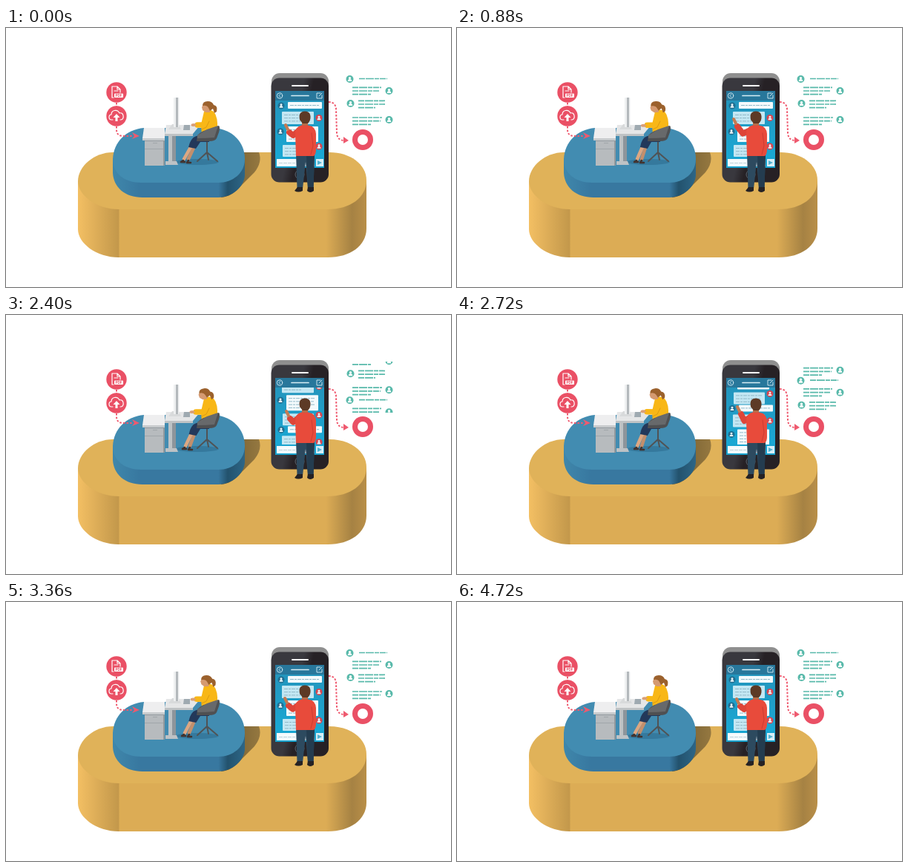
Write an HTML page that moves like this. It is 600 by 350 pixels and loops after 4800 ms.

```html
<!DOCTYPE html>
<html lang="en">
<head>
<meta charset="utf-8">
<title>Chat and upload</title>
<style>
html, body { margin: 0; width: 100%; height: 100%; overflow: hidden; background: #fff; }
svg { display: block; width: 600px; height: 350px; }
.line { fill: none; stroke-linecap: round; stroke-linejoin: round; }
.dots { fill: none; stroke: #ef5a6f; stroke-width: 2; stroke-dasharray: 2.6 2; }
</style>
</head>
<body>
<svg viewBox="0 0 600 350">
  <defs>
    <linearGradient id="goldSide" gradientUnits="userSpaceOnUse" x1="97" x2="486" y1="0" y2="0">
      <stop offset="0" stop-color="#f3bf63"/><stop offset=".14" stop-color="#c3984b"/>
      <stop offset=".145" stop-color="#dcac55"/><stop offset=".86" stop-color="#dcac55"/>
      <stop offset=".95" stop-color="#a68243"/><stop offset="1" stop-color="#b98f48"/>
    </linearGradient>
    <linearGradient id="blueSide" gradientUnits="userSpaceOnUse" x1="144" x2="322" y1="0" y2="0">
      <stop offset="0" stop-color="#3f87ab"/><stop offset=".2" stop-color="#3878a0"/>
      <stop offset=".8" stop-color="#3878a0"/><stop offset=".87" stop-color="#23526d"/>
      <stop offset="1" stop-color="#2d6687"/>
    </linearGradient>
    <linearGradient id="shade"><stop offset="0" stop-color="#6d582e"/><stop offset="1" stop-color="#957840"/></linearGradient>
    <linearGradient id="screen" x2="0" y2="1"><stop offset="0" stop-color="#2592b9"/><stop offset="1" stop-color="#18abd8"/></linearGradient>
    <linearGradient id="phoneFace" y2=".4"><stop offset=".5" stop-color="#39383e"/><stop offset=".65" stop-color="#262125"/></linearGradient>
    <clipPath id="feedClip"><rect x="450" y="63" width="80" height="69"/></clipPath>
    <clipPath id="chatClip"><rect x="363" y="98" width="66" height="77"/></clipPath>
  </defs>

  <!-- platforms -->
  <path fill="url(#goldSide)" d="M97 207V272C97 291 122 310 152 310H434C464 310 486 294 486 271V207Z"/>
  <path fill="#e0b259" d="M144 168H436C464 168 486 184 486 206C486 229 464 245 434 245H152C122 245 97 226 97 207C97 187 119 168 144 168Z"/>
  <path fill="url(#shade)" d="M300 168H341Q346 181 335 195L318 212Q305 228 290 229Z"/>
  <path fill="url(#blueSide)" d="M144 176V196C145 215 160 229 184 229H286C305 229 322 214 322 198V176Z"/>
  <path fill="#428cb1" d="M186 135H281C305 137 322 154 322 177C322 196 306 209 286 209H182C160 209 144 197 144 177C145 154 162 137 186 135Z"/>
  <ellipse cx="258" cy="181" rx="29" ry="4" fill="#35799d"/>

  <!-- upload badges -->
  <path class="dots" d="M149 101V106M149 133V137Q149 146 158 146H170"/>
  <path fill="#ef5a6f" d="M170 141L180 146L170 150L173 146Z"/>
  <g fill="#ea5065"><circle cx="149" cy="87" r="13.7"/><circle cx="149" cy="119" r="13.7"/></g>
  <g class="line" stroke="#fff" stroke-width="1.2">
    <path d="M145 94H143V79H150L154 83V87M150 79V83H154M146 85H151"/>
    <path d="M144 124H142C138 124 138 117 142 117C142 111 150 109 153 115C159 113 160 124 155 124H154"/>
  </g>
  <rect x="146" y="88.500" width="12" height="5.500" rx="1" fill="#fff"/>
  <text x="152" y="92.800" font-family="Liberation Sans, sans-serif" font-size="4.500" font-weight="700" fill="#ea5065" text-anchor="middle">PDF</text>
  <path fill="#fff" d="M149 116L153.500 121H150.500V126H147.500V121H144.500Z"/>

  <!-- desk -->
  <path fill="#8d959b" d="M219 143H229V180H219Z"/>
  <path fill="#bdc2c5" d="M219 143H224V180H219ZM215 180H230L232 185H215Z"/>
  <path fill="#92999e" d="M187 148H214V186H187Z"/>
  <path fill="#b7bbbe" d="M187 153H212V186H187Z"/>
  <path fill="#a0a6aa" d="M187 163H212V164H187ZM198 155H204V156H198Z"/>
  <path fill="#eeeeef" d="M186 135H214V149H184Z"/>
  <path fill="#c8cbcd" d="M184 149H214V152H184Z"/>
  <path fill="#e5e6e7" d="M216 131H262L252 143H214Z"/>
  <path fill="#bfc3c5" d="M214 143H252V146H214Z"/>
  <path fill="#d8dadb" d="M219 137L224 130H233L236 137Z"/>
  <rect x="226" y="94" width="7.500" height="40" rx="1" fill="#eef0f1"/>
  <path fill="#b4b9bc" d="M229 94H232V134H229Z"/>
  <path fill="#9faab1" d="M240 131H248V138H239Z"/>

  <!-- seated woman -->
  <g class="line">
    <path stroke="#505355" stroke-width="2" d="M271 151V170M271 168L258 180M271 168L285 180M271 168L273 178"/>
    <path id="farCalf" stroke="#c38f6c" stroke-width="4.500"/>
    <path id="nearCalf" stroke="#dca782" stroke-width="4.500"/>
    <path id="feet" stroke="#42332f" stroke-width="2.500"/>
  </g>
  <path id="skirt" fill="#23385a"/>
  <path fill="#f8b717" d="M267 113Q274 108 280 113Q286 120 285 137L281 145H264L263 130Z"/>
  <path id="sleeve" class="line" stroke="#f8b717" stroke-width="7.500"/>
  <path class="line" stroke="#dc9c13" stroke-width="1" d="M274 126L270 134L264 137"/>
  <ellipse id="typingHand" rx="3.500" ry="2" fill="#d9a078"/>
  <path fill="#4f5052" d="M287 132Q289 134 287 141L284 149Q282 153 274 153H257L258 145Q265 138 274 137Z"/>
  <path fill="#67696b" d="M286 132L271 137L258 145V149Q270 149 281 148Z"/>
  <g id="womanHead">
    <path fill="#d59a71" d="M266 103H275V114H269L265 111L264 107Z"/>
    <path fill="#9b612d" d="M265 105Q265 99 272 99Q278 99 280 104Q286 105 284 113L281 115L279 109L275 112L273 108Q271 104 265 105Z"/>
  </g>

  <!-- phone -->
  <rect x="358" y="61" width="77" height="134" rx="11" fill="#8f8f8f"/>
  <rect x="357.500" y="67.500" width="77.500" height="141" rx="11" fill="url(#phoneFace)"/>
  <path class="line" stroke="#fff" stroke-width="2" d="M386 78H407"/>
  <circle cx="396" cy="198" r="6" fill="none" stroke="#5a6670"/>
  <rect x="363" y="85" width="66" height="104" fill="url(#screen)"/>
  <g clip-path="url(#chatClip)"><g id="chatRows"></g></g>
  <path fill="#28779b" d="M363 85H429V98H363Z"/>
  <g class="line" stroke="#d8eef5" stroke-width=".9">
    <circle cx="369" cy="91.500" r="3.700"/><path d="M370 89.500L368 91.500L370 93.500"/>
    <path stroke-width="1.700" d="M385 91.500H408"/>
    <path d="M424 88H419V95H426V91M422 92L426 88"/>
  </g>
  <path fill="#18a3cf" d="M363 175H429V189H363Z"/>
  <path fill="#f5fafc" d="M365 177H416V187H365Z"/>
  <path stroke="#bdd2da" d="M368 182.500H390" stroke-dasharray="5 1"/>
  <path fill="#d8eff7" d="M418 177H428V187H418Z"/>
  <path fill="#4fb1d0" d="M420 179L426 182L420 185V182Z"/>

  <!-- standing man -->
  <path fill="#2d4a5f" d="M391 169H416L414.500 217H407L404 181L400 217H392.500Z"/>
  <path fill="#243c4f" d="M405 171H416L414.500 217H407Z"/>
  <path fill="#252224" d="M393 215H400V220Q394 223 389 220ZM407 215H415V220Q410 224 406 220Z"/>
  <path id="reachingArm" class="line" stroke="#dd4538" stroke-width="8"/>
  <path id="reachingHand" class="line" stroke="#c47b52" stroke-width="4"/>
  <path fill="#e84b3b" d="M397 132Q403 129 409 132Q417 133 418 143V165Q418 170 415 173H391L390 143Q390 134 397 132Z"/>
  <path class="line" stroke="#cb3c33" stroke-width="1" d="M412 142L414 159L411 171"/>
  <path fill="#b76d48" d="M399 124H407V131Q403 133 399 131Z"/>
  <path fill="#5d3a26" d="M395.500 119Q396 112.500 403 112.500Q410 112.500 410.500 119Q411 125 407 129H400L396 124Z"/>

  <!-- outgoing feed -->
  <path class="dots" d="M435 100Q444 100 445 109L446 142Q447 152 456 152"/>
  <path fill="#ef5a6f" d="M455 147L462 152L455 156Z"/>
  <circle cx="481" cy="151" r="14" fill="#ea5065"/>
  <circle cx="481" cy="151" r="7" fill="#fff"/>
  <g clip-path="url(#feedClip)"><g id="feedRows"></g></g>
</svg>
<script>
const LOOP = 4800, STEP = 80, FEED_PERIOD = 69, CHAT_PERIOD = 75;
const $ = id => document.getElementById(id);
const setPath = (id, d) => $(id).setAttribute('d', d);
const smooth = u => { u = Math.max(0, Math.min(1, u)); return u * u * (3 - 2 * u); };

const person = (x, y, r, color, face) =>
  `<circle cx="${x}" cy="${y}" r="${r}" fill="${color}"/>
   <g fill="${face}"><circle cx="${x}" cy="${y - r * .28}" r="${r * .33}"/>
   <path d="M${x - r * .55} ${y + r * .6}q0 ${-r * .6} ${r * .55} ${-r * .6}t${r * .55} ${r * .6}z"/></g>`;

const textLines = (x, y, widths, gap, color, weight, dash) => widths.map((w, i) =>
  `<path d="M${x} ${y + i * gap}h${w}" stroke="${color}" stroke-width="${weight}" stroke-dasharray="${dash}"/>`).join('');

// icon x, icon y, text x, text y, line widths
const feed = [
  [463.5, 69, 476, 68.5, [38]],
  [516.5, 85, 467, 80.3, [39, 37, 25]],
  [464.5, 102, 475, 98.3, [37, 36, 23]],
  [516.5, 124, 467, 121, [40, 38, 25]]
];
// icon x, icon y, icon color, bubble x, y, width, height, bubble color
const chat = [
  [371, 105, '#1f6d90', 380, 100, 46, 9, '#f4fafc'],
  [422, 121.5, '#d9434e', 372, 113, 43, 17, '#c3e7f3'],
  [370, 140, '#1f6d90', 378, 133, 43, 21, '#f4fafc'],
  [422, 160, '#d9434e', 373, 158, 42, 16, '#c3e7f3']
];

const feedBlock = feed.map(([ix, iy, x, y, widths]) =>
  person(ix, iy, 5, '#58b9aa', '#fff') +
  textLines(x, y, widths, 4.7, '#58b9aa', 1.7, '8 1 11 1 6 1')).join('');
const chatBlock = chat.map(([ix, iy, color, x, y, w, h, fill]) =>
  `<rect x="${x}" y="${y}" width="${w}" height="${h}" rx="1" fill="${fill}"/>` +
  person(ix, iy, 4.5, color, '#e8f4f8') +
  textLines(x + 3, y + 4.5, h < 10 ? [w - 7] : h < 20 ? [w - 7, w - 9, w - 20] : [w - 7, w - 9, w - 8, w - 20],
    4.2, '#91b9c8', 1, '5 1 3 1')).join('');

const repeat = (block, period) => block + `<g transform="translate(0 ${period})">${block}</g>`;
$('feedRows').innerHTML = repeat(feedBlock, FEED_PERIOD);
$('chatRows').innerHTML = repeat(chatBlock, CHAT_PERIOD);

// time followed by the values reached at that time
const handKeys = [[0, 378, 133], [480, 378, 132], [880, 374, 125], [1280, 378, 131], [1760, 388, 124],
  [2080, 381, 129], [2400, 379, 132], [2720, 379, 126], [3040, 378, 130], [3360, 377, 132], [4800, 378, 133]];
// head shift and foot shift
const womanKeys = [[0, 0, 0], [880, -4, 3], [1760, -2, 1], [2400, -5, 2], [2720, -5, 3], [3360, -2, 1], [4800, 0, 0]];

function pose(keys, t) {
  const i = keys.findIndex(k => k[0] > t), a = keys[i - 1], b = keys[i];
  const u = smooth((t - a[0]) / (b[0] - a[0]));
  return a.slice(1).map((v, j) => v + (b[j + 1] - v) * u);
}

function draw(t) {
  const scroll = smooth((t - 1930) / 1220) % 1;
  $('feedRows').setAttribute('transform', `translate(0 ${-FEED_PERIOD * scroll})`);
  $('chatRows').setAttribute('transform', `translate(0 ${-CHAT_PERIOD * scroll})`);

  const [hx, hy] = pose(handKeys, t);
  const ex = 387 + (hx - 378) * .4, ey = 145 + (hy - 133) * .3;
  setPath('reachingArm', `M396 138L${ex} ${ey}L${hx + 4} ${hy + 8}`);
  setPath('reachingHand', `M${hx + 2} ${hy + 4}L${hx} ${hy}l-1 -2`);

  const [head, foot] = pose(womanKeys, t);
  $('womanHead').setAttribute('transform', `translate(${head * .8} 0) rotate(${head} 273 112)`);
  setPath('skirt', `M272 144L257 146Q249 148 ${246 + foot * .3} 161L${256 + foot * .3} 163L262 154H274Z`);
  setPath('farCalf', `M${253 + foot * .3} 162L${246 + foot} 177`);
  setPath('nearCalf', `M${249 + foot * .3} 161L${240 + foot} 177`);
  setPath('feet', `M${239 + foot} 179l-3 2h5M${246 + foot} 179l-2 3h5`);

  const tap = Math.sin(t / LOOP * Math.PI * 24) * .7, wrist = 254 + head * .4;
  setPath('sleeve', `M272 118L268 131L${wrist + 4} ${131 + tap * .4}`);
  $('typingHand').setAttribute('cx', wrist - 1);
  $('typingHand').setAttribute('cy', 131 + tap);
}

function frame() {
  draw(Math.floor(performance.now() % LOOP / STEP) * STEP);
  requestAnimationFrame(frame);
}
frame();
</script>
</body>
</html>
```
